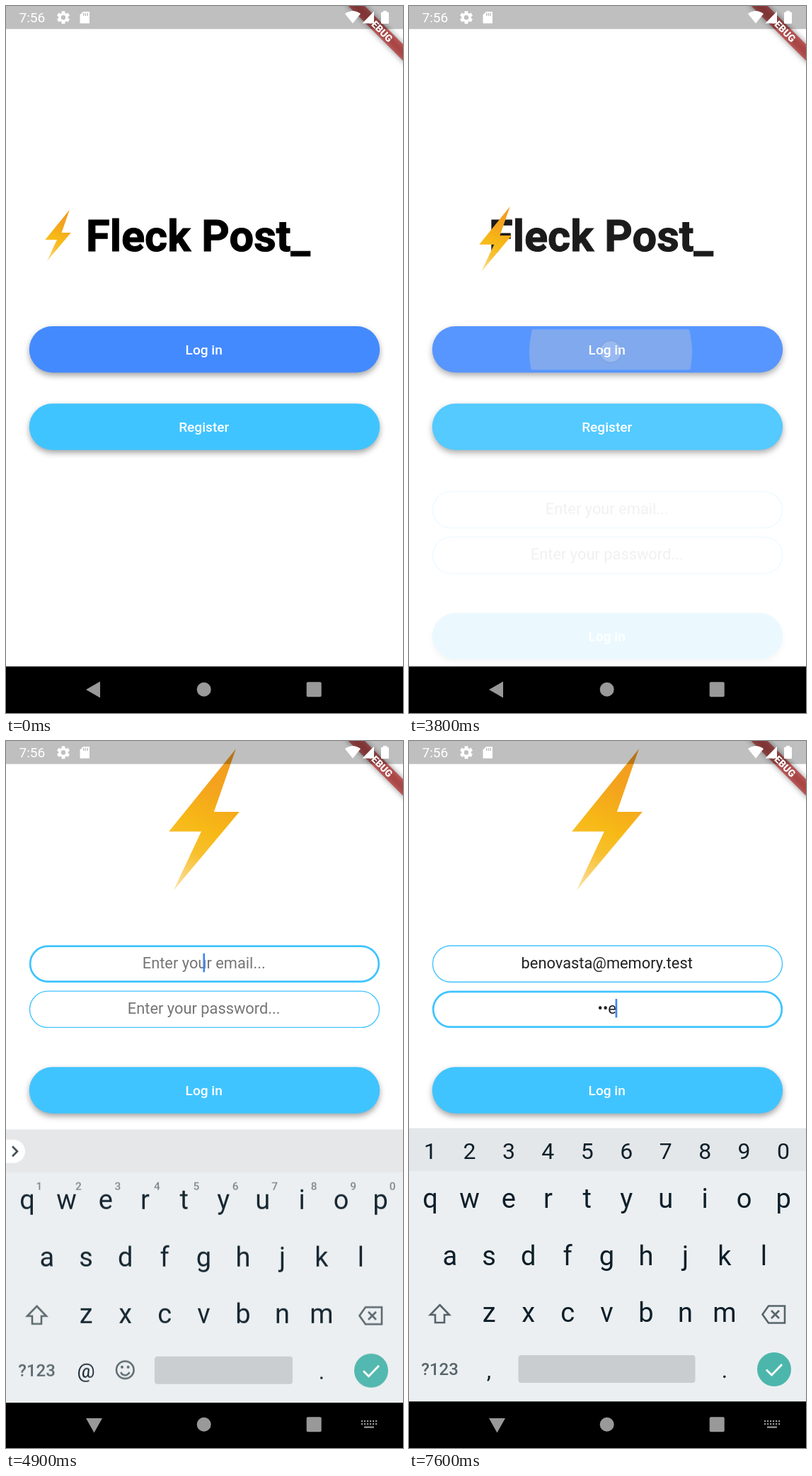
These frames come from a looping animation (561 by 998 pixels, 8 s). An HTML page with a canvas:

```html
<!DOCTYPE html>
<html lang="en">
<head>
<meta charset="utf-8">
<title>Login flow</title>
<style>
html, body { margin: 0; width: 100%; height: 100%; overflow: hidden; background: #fff; }
canvas { display: block; }
</style>
</head>
<body>
<canvas id="stage" width="561" height="998"></canvas>
<script>
const W = 561, H = 998, LOOP = 8000, STEP = 100;
const screen2d = document.getElementById('stage').getContext('2d');
const buffer = document.createElement('canvas');
buffer.width = W;
buffer.height = H;
const buffer2d = buffer.getContext('2d');
let c = screen2d;

const TITLE = 'Fleck Post';
const EMAIL = 'benovasta@memory.test';
const SKY = '#40c4ff', BLUE = '#448aff', INK = '#212121', HINT = '#757575';
const KEY_INK = '#0d1f2a', KEY_GRAY = '#56646b';

const clamp = (v, a = 0, b = 1) => Math.min(b, Math.max(a, v));

function bezier(x1, y1, x2, y2) {
  const at = (a, b, s) => 3 * a * s * (1 - s) ** 2 + 3 * b * s * s * (1 - s) + s ** 3;
  return x => {
    let lo = 0, hi = 1;
    for (let i = 0; i < 24; i++) {
      const mid = (lo + hi) / 2;
      if (at(x1, x2, mid) < x) lo = mid; else hi = mid;
    }
    return at(y1, y2, lo);
  };
}
const easeIn = bezier(.42, 0, 1, 1);
const fastOutSlowIn = bezier(.4, 0, .2, 1);

// ---- drawing helpers ----
function rect(x, y, w, h, fill) {
  c.fillStyle = fill;
  c.fillRect(x, y, w, h);
}

function round(x, y, w, h, r, fill) {
  c.beginPath();
  c.roundRect(x, y, w, h, r);
  c.fillStyle = fill;
  c.fill();
}

function disc(x, y, r, fill) {
  c.beginPath();
  c.arc(x, y, r, 0, 7);
  c.fillStyle = fill;
  c.fill();
}

function poly(points, fill) {
  c.beginPath();
  points.forEach(([x, y]) => c.lineTo(x, y));
  c.closePath();
  c.fillStyle = fill;
  c.fill();
}

function line(points, color, width, closed) {
  c.beginPath();
  points.forEach(([x, y]) => c.lineTo(x, y));
  if (closed) c.closePath();
  c.strokeStyle = color;
  c.lineWidth = width;
  c.stroke();
}

function text(s, x, y, size, fill, weight = 400, align = 'center') {
  c.font = `${weight} ${size}px Roboto, sans-serif`;
  c.textAlign = align;
  c.fillStyle = fill;
  c.fillText(s, x, y);
  return c.measureText(s).width;
}

// Draws a group with one common opacity and vertical shift.
function group(alpha, dy, draw) {
  buffer2d.clearRect(0, 0, W, H);
  c = buffer2d;
  draw();
  c = screen2d;
  c.globalAlpha = alpha;
  c.drawImage(buffer, 0, dy);
  c.globalAlpha = 1;
}

// ---- page parts ----
function button(label, y, fill, ripple) {
  c.save();
  c.shadowColor = 'rgba(0,0,0,.36)';
  c.shadowBlur = 9;
  c.shadowOffsetY = 4;
  round(32.8, y, 495.4, 65.5, 32.7, fill);
  c.restore();
  if (ripple) {
    c.save();
    c.beginPath();
    c.rect(33, y + 4.5, 495, 57);
    c.clip();
    disc(285, 488, ripple, 'rgba(200,200,200,.34)');
    c.restore();
  }
  text(label, 279.7, y + 39.5, 19.1, '#fff', 500);
}

function field(y, value, focused, hint, cursor) {
  c.beginPath();
  const w = focused ? 2.73 : 1.365;
  c.roundRect(32.8 + w / 2, y + w / 2, 495.4 - w, 52.6 - w, 26);
  c.strokeStyle = SKY;
  c.lineWidth = w;
  c.stroke();
  const width = text(value || hint, 279.7, y + 32.6, 21.84, value ? INK : HINT);
  if (cursor) rect(278.4 + (value ? width / 2 : 0), y + 11.5, 2.7, 26.5, '#4285f4');
}

function bolt(x, y, h) {
  c.save();
  c.translate(x, y);
  c.scale(h / 245, h / 245);
  const g = c.createLinearGradient(58, -122, -58, 122);
  g.addColorStop(0, '#f39a20');
  g.addColorStop(.3, '#f4a41d');
  g.addColorStop(.55, '#f7b916');
  g.addColorStop(.72, '#f8c02f');
  g.addColorStop(1, '#fce3ac');
  poly([[55, -122.5], [17, -13.5], [61, -13.5], [-53, 122.5], [-5, 20.5], [-61, 20.5]], g);
  c.restore();
}

function title(t) {
  let count = TITLE.length, alpha = 1;
  if (t < 500) alpha = 1 - t / 500;
  else if (t < 800) return;
  else count = Math.min(count, 1 + Math.floor((t - 770) / 262));
  const s = TITLE.slice(0, count) + (t < 3900 ? '_' : '');
  c.globalAlpha = alpha;
  text(s, 113, 346, 61.4, '#000', 700, 'left');
  c.strokeStyle = '#000';
  c.lineWidth = 1;
  c.lineJoin = 'miter';
  c.strokeText(s, 113, 346);
  c.globalAlpha = 1;
}

function welcome(t) {
  title(t);
  const ripple = t >= 3500 ? 20 + (t - 3500) * .317 : 0;
  button('Log in', 452, BLUE, ripple);
  button('Register', 561.3, SKY);
}

function emailText(t) {
  if (t >= 6300) return EMAIL;
  return EMAIL.slice(0, clamp((t - 5100) / 100, 0, 3));
}

function passwordText(t) {
  if (t < 7400) return '';
  const n = Math.min(2, Math.floor((t - 7400) / 100));
  return '•'.repeat(n) + 'ole'[n];
}

function login(t) {
  const top = t >= 4800 ? 288.3 : 505.5;
  const onEmail = t >= 4600 && t < 6900, onPass = t >= 6900;
  const blink = t < 5100 || (t >= 5200 && t < 5900) || (t >= 6300 && t < 6800);
  rect(0, 0, W, H, '#fff');
  field(top, emailText(t), onEmail, 'Enter your email...', onEmail && blink);
  field(top + 64.2, passwordText(t), onPass, 'Enter your password...', onPass);
  button('Log in', top + 172, SKY);
}

// ---- keyboard ----
const keyX = i => 30 + 55.45 * i;

function suggestions(t) {
  if (t < 5200 || t >= 6400) return;
  if (t >= 6200) rect(186, 547, 213, 60, '#d6dadc');
  const s = EMAIL.slice(0, clamp((t - 5100) / 100, 1, 3));
  text(s, 124, 586, 23, KEY_INK);
  text(EMAIL, 292.5, 585, 17, KEY_INK, 500);
  text(s[0].toUpperCase() + s.slice(1), 461, 586, 23, KEY_INK);
  rect(185, 563, 1, 32, '#c6cbce');
  rect(399, 563, 1, 32, '#c6cbce');
}

function keyboard(t) {
  const secret = t >= 7000;
  rect(0, 546.5, W, 61, '#e4e7e9');
  rect(0, 607, W, 325, '#eceff1');
  if (secret) {
    [...'1234567890'].forEach((k, i) => text(k, keyX(i), 590, 32, KEY_INK));
  } else {
    round(-20, 561, 47, 33, 16.5, '#fff');
    line([[9, 570.5], [16, 577.5], [9, 584.5]], '#37444b', 2.6);
    suggestions(t);
    [...'1234567890'].forEach((k, i) => text(k, keyX(i) + 17, 632, 15.5, '#78858c', 500));
  }
  [...'qwertyuiop'].forEach((k, i) => text(k, keyX(i), 659, 38, KEY_INK));
  [...'asdfghjkl'].forEach((k, i) => text(k, keyX(i + .5), 739.5, 38, KEY_INK));
  [...'zxcvbnm'].forEach((k, i) => text(k, keyX(i + 1.5), 820, 38, KEY_INK));

  line([[43.5, 796], [57, 810], [50, 810], [50, 821], [37, 821], [37, 810], [30, 810]], KEY_GRAY, 2.6, true);
  line([[508, 797.5], [531, 797.5], [531, 821.5], [508, 821.5], [499.5, 809.5]], KEY_GRAY, 2.6, true);
  line([[512, 804], [523, 815]], KEY_GRAY, 2.6);
  line([[523, 804], [512, 815]], KEY_GRAY, 2.6);

  text('?123', 43.5, 895, 24, KEY_GRAY, 500);
  if (secret) {
    text(',', 113, 899, 32, KEY_INK);
    round(154.5, 867, 250, 39, 4, '#c9cdcf');
  } else {
    text('@', 113, 897, 28, KEY_INK);
    c.strokeStyle = KEY_GRAY;
    c.lineWidth = 2.5;
    c.beginPath();
    c.arc(168.3, 886, 12.3, 0, 7);
    c.stroke();
    c.beginPath();
    c.arc(168.3, 887, 6.5, .35, Math.PI - .35);
    c.stroke();
    disc(164, 882, 2, KEY_GRAY);
    disc(172.6, 882, 2, KEY_GRAY);
    round(210, 867, 195, 39, 4, '#c9cdcf');
  }
  text('.', 446, 899, 32, KEY_INK);
  disc(516, 887, 24, '#4db6ac');
  line([[505, 887.5], [512.5, 895], [527, 880]], '#fff', 2.8);
}

// ---- system bars ----
function gear(x, y) {
  c.save();
  c.translate(x, y);
  for (let i = 0; i < 6; i++) {
    rect(-2.4, -9, 4.8, 5, '#fff');
    c.rotate(Math.PI / 3);
  }
  c.beginPath();
  c.arc(0, 0, 5, 0, 7);
  c.strokeStyle = '#fff';
  c.lineWidth = 3.6;
  c.stroke();
  c.restore();
}

function banner() {
  c.save();
  c.translate(W, 0);
  c.rotate(Math.PI / 4);
  c.filter = 'blur(4px)';
  rect(-60, 38.2, 120, 16.4, 'rgba(0,0,0,.45)');
  c.filter = 'none';
  rect(-60, 38.2, 120, 16.4, 'rgba(183,28,28,.63)');
  c.restore();
}

function statusBar() {
  banner();
  rect(0, 0, W, 32.5, 'rgba(0,0,0,.25)');
  text('7:56', 18.5, 23.3, 19.1, '#fff', 400, 'left');
  gear(81, 16.2);
  poly([[109, 8], [118, 8], [118, 24.5], [104.5, 24.5], [104.5, 12.5]], '#fff');
  for (let i = 0; i < 3; i++) rect(109 + i * 2.8, 10, 1.4, 4, '#bfbfbf');
  c.beginPath();
  c.moveTo(490, 24.5);
  c.lineTo(479, 11);
  c.quadraticCurveTo(490, 3, 501, 11);
  c.fillStyle = '#fff';
  c.fill();
  poly([[520, 7.5], [520, 24.5], [503.5, 24.5]], '#fff');
  round(530, 8.5, 11, 16.5, 1.5, '#fff');
  rect(533, 6.8, 5, 2.5, '#fff');
  c.save();
  c.translate(W, 0);
  c.rotate(Math.PI / 4);
  text('DEBUG', 0, 51.2, 13.9, '#fff', 900);
  c.restore();
}

function navBar(open, dy) {
  const gray = '#999';
  rect(0, 932.3 + dy, W, 66, '#000');
  if (open) {
    poly([[113, 956], [136, 956], [124.5, 976.5]], gray);
    for (let row = 0; row < 2; row++)
      for (let i = 0; i < 6; i++) rect(502 + i * 4, 959 + row * 4, 2.2, 2.2, gray);
    rect(506, 967.5, 14, 2.2, gray);
  } else {
    poly([[113, 965], [133, 953.5], [133, 976.5]], gray);
  }
  disc(279.7, 964.7, 10, gray);
  round(424.7, 954.3, 21, 21, 2, gray);
}

const taps = [[3500, 285, 488], [4500, 290, 533], [6200, 293, 580], [6800, 294, 389]];

function touches(t) {
  for (const [start, x, y] of taps) {
    const age = t - start;
    if (age < 0 || age >= 400) continue;
    c.globalAlpha = clamp(1.25 - age / 400);
    disc(x, y, 15, 'rgba(255,255,255,.4)');
    c.beginPath();
    c.arc(x, y, 15.3, 0, 7);
    c.strokeStyle = 'rgba(120,140,165,.32)';
    c.lineWidth = 2.2;
    c.stroke();
    c.globalAlpha = 1;
  }
}

// ---- timeline ----
function draw(t) {
  const open = t >= 4800;
  const slide = t === 4800 ? 18 : t === 4900 ? 1.7 : 0;
  const p = clamp((t - 3725) / 280);
  rect(0, 0, W, H, '#fff');

  if (p < 1) welcome(t);
  if (p > 0) group(easeIn(p), 249.5 * (1 - fastOutSlowIn(p)), () => login(t));

  if (open) {
    bolt(280, 111, 200);
    group(slide > 10 ? .6 : slide ? .96 : 1, slide, () => keyboard(t));
  } else {
    const v = p > 0 ? fastOutSlowIn(p) : 0;
    bolt(73.5 + 206.5 * v ** 1.14, 324 - 20.5 * v * v + 33 * v * (1 - v), 73 + 172 * v ** 1.74);
  }
  statusBar();
  navBar(open, slide);
  touches(t);
}

const start = performance.now();
function tick() {
  const t = (performance.now() - start) % LOOP;
  draw(Math.floor(t / STEP) * STEP);
  requestAnimationFrame(tick);
}
tick();
</script>
</body>
</html>
```
